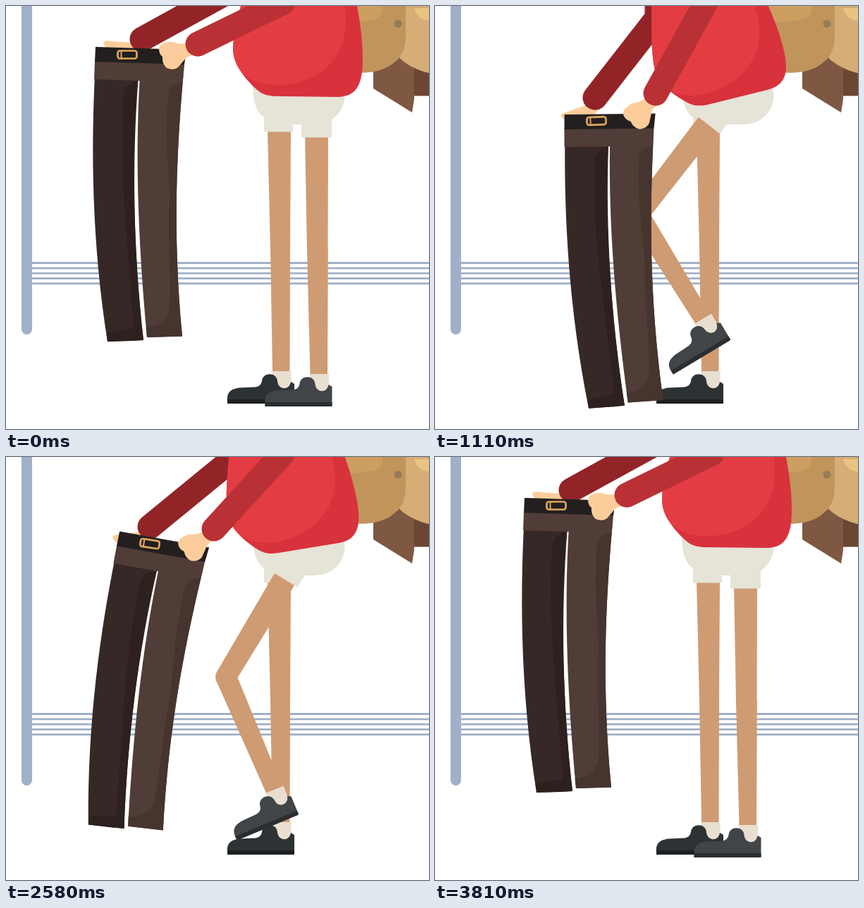
Animation, 600 px wide and 600 px high, one loop 4.23 s. Source, as an HTML page with a canvas:

```html
<!DOCTYPE html>
<html lang="en">
<head>
<meta charset="utf-8">
<title>Trying on trousers</title>
<style>
html, body { margin: 0; width: 100%; height: 100%; overflow: hidden; background: #fff; }
canvas { display: block; width: 100vw; height: 100vh; }
</style>
</head>
<body>
<canvas id="stage" width="600" height="600"></canvas>
<script>
const ctx = document.getElementById('stage').getContext('2d');
const LOOP = 4230, STEP = 30, END = 3810;
const SKIN = '#cf9b72', HAND = '#fccd9b', SOCK = '#e9dfd0', SHORTS = '#e6e3d7', RACK = '#9fb0c8';

// Pose tracks, one value per key time; angles in degrees.
const TIMES = [0, 540, 660, 1110, 1680, 2160, 2580, 3330, 3810];
const TRACKS = {
  buckleX: [172, 225, 230, 229, 216, 210, 204, 173, 172],
  buckleY: [69, 165, 163, 163, 158, 154, 123, 74, 69],
  trousers: [0, -2.8, -2.9, -2.4, .4, 2.7, 8.4, .1, 0],
  body: [0, -12.5, -14, -14.6, -17.5, -16.5, -10, -.8, 0],
  thigh: [0, 27, 31, 38, 33, 32.5, 31.4, 2.2, 0],
  shin: [0, -22, -25, -31, -19, -20.5, -22.5, -1.2, 0],
  rearWristX: [193, 224, 230, 227, 210, 206, 204, 192, 193],
  rearWristY: [47, 130, 128, 130, 134, 130, 99, 50, 47],
  rearElbowX: [315, 318, 318, 315, 302, 307, 325, 314, 315],
  rearElbowY: [-20, 12, 16, 17, 28, 24, 0, -18, -20],
  frontWristX: [272, 310, 314, 313, 303, 299, 295, 272, 272],
  frontWristY: [54, 124, 123, 124, 122, 119, 102, 58, 54],
  frontElbowX: [393, 385, 384, 383, 376, 379, 392, 393, 393],
  frontElbowY: [-5, -4, -4, -3, 0, -1, -4, -4, -5]
};

// Monotone cubic interpolation: flat at turning points, smooth elsewhere.
function sample(values, t) {
  const last = TIMES.length - 1;
  if (t >= TIMES[last]) return values[last];
  const secant = i => (values[i + 1] - values[i]) / (TIMES[i + 1] - TIMES[i]);
  const slope = i => {
    if (i === 0 || i === last) return 0;
    const a = secant(i - 1), b = secant(i);
    return a * b > 0 ? 2 * a * b / (a + b) : 0;
  };
  const i = TIMES.findIndex(time => time > t) - 1;
  const h = TIMES[i + 1] - TIMES[i], u = (t - TIMES[i]) / h, v = 1 - u;
  return values[i] * v * v * (1 + 2 * u) + values[i + 1] * u * u * (3 - 2 * u)
    + h * u * v * (slope(i) * v - slope(i + 1) * u);
}

function fill(color, path) {
  ctx.fillStyle = color;
  ctx.fill(new Path2D(path));
}

function line(color, width, path, cap = 'butt') {
  ctx.strokeStyle = color;
  ctx.lineWidth = width;
  ctx.lineCap = cap;
  ctx.lineJoin = 'round';
  ctx.stroke(new Path2D(path));
}

function disc(color, x, y, r) {
  ctx.fillStyle = color;
  ctx.beginPath();
  ctx.arc(x, y, r, 0, 7);
  ctx.fill();
}

// Draws with the point (x, y) moved by (dx, dy) and turned about itself.
function posed(x, y, degrees, draw, dx = 0, dy = 0) {
  ctx.save();
  ctx.translate(x + dx, y + dy);
  ctx.rotate(degrees * Math.PI / 180);
  ctx.translate(-x, -y);
  draw();
  ctx.restore();
}

function rack() {
  line(RACK, 15, 'M29.5 -20V458.5', 'round');
  for (let i = 0; i < 5; i++) line(RACK, 2.8, `M37 ${364.5 + 7.3 * i}H600`);
}

function coats() {
  fill('#6b4632', 'M576 80H600V127.5H576Z');
  fill('#7e5843', 'M521 70H579V132L576 151L521 117Z');
  fill('#c1945b', 'M470 0H568V42C567 62 563 70 552 79C535 94 512 98 470 92Z');
  fill('#cc9f61', 'M470 0H534C535 12 530 18 518 20L470 25Z');
  fill('#d7ad77', 'M567 0H600V95C580 91 561 78 558 73Q567 62 567 42Z');
  fill('#e9c381', 'M579 3H600V21Q583 19 579 3Z');
  disc('#957b58', 556, 25, 5.5);
}

function foot(upper, sole) {
  fill(SOCK, 'M377 518H404.5V545H380Z');
  fill(upper, 'M314 560C313 547 320 543 331 541.5L354 540.5Q362 539 363 532C364 519 384 519 385 532C386 545 402 546 404 533L409 536V564H314Z');
  fill(sole, 'M314 558H409V562Q409 564 407 564H314Z');
}

function standingLeg() {
  fill(SKIN, 'M371 176H404L403 345L402.5 519H378L375 345Z');
  foot('#2d3234', '#1c1f20');
}

function shorts() {
  fill(SHORTS, 'M350 112L351 128Q354 150 366 158V178.5H407V168H440L480 112Z');
  disc(SHORTS, 440, 127, 40.5);
}

function movingLeg(p) {
  posed(441, 99, p.thigh, () => {
    fill(SKIN, 'M424 180H457L456.5 348H427Z');
    // The shin angle is absolute, so the thigh's turn is undone here.
    posed(441.8, 348, p.shin - p.thigh, () => {
      fill(SKIN, 'M427 346H456.8L456 523H431.5Z');
      disc(SKIN, 441.8, 348, 14.8);
      ctx.save();
      ctx.translate(53.5, 4);
      foot('#414548', '#2b2e31');
      ctx.restore();
    });
    fill(SHORTS, 'M419 140H462V186.5H419Z');
  });
}

function sweater(p) {
  posed(431, 115, p.body, () => {
    const left = 'M352 -80L340 -26Q322 38 322 60';
    fill('#d8323d', left + 'C322 75 330 92 345 108C358 122 365 128 385 128L470 129C498 129 506 110 506 75C506 40 500 0 480 -80Z');
    fill('#e33d43', left + 'C322 74 327 86 336 96C350 109 372 113 390 112C440 110 482 78 482 22C482 -10 475 -40 460 -80Z');
  });
}

function trousers(p) {
  posed(172, 69, p.trousers, () => {
    fill('#362826', 'M126 98C121 200 121 330 144 476L195 474C181 350 178 220 188 100Z');
    fill('#2d201f', 'M186 106C178 220 181 350 195 474L178 475L181 455C176 370 159 235 166 130Q168 109 186 106Z');
    fill('#2d201f', 'M142.5 464L181 457L180 475L144 476Z');
    fill('#513d37', 'M126 78L253 82C242 200 236 320 250 468.5L200 470C188 340 183 220 189.5 106L125 104Z');
    fill('#46342f', 'M253 82C242 200 236 320 250 468.5L200 470L198.5 456Q229 454 232 425C234 380 229 330 232 270C230 220 225 190 230 125Q231 109 250 108Z');
    fill('#231f1f', 'M127 58L256 62L253 83L126 79Z');
    ctx.strokeStyle = '#dfa75c';
    ctx.lineWidth = 2.7;
    ctx.beginPath();
    ctx.roundRect(158.5, 63.5, 27, 11, 3);
    ctx.stroke();
    line('#dfa75c', 2, 'M163.5 64V74');
  }, p.buckleX - 172, p.buckleY - 69);
}

function arm(p, side, color) {
  const x = p[side + 'WristX'], y = p[side + 'WristY'];
  const ex = p[side + 'ElbowX'], ey = p[side + 'ElbowY'];
  const angle = Math.atan2(y - ey, x - ex) * 180 / Math.PI;
  if (side === 'rear') {
    posed(193, 47, angle - 151, () =>
      fill(HAND, 'M138 53Q139 48 148 50L164 51L185 52L203 60L174 72L150 74Q143 72 144 64Z'), x - 193, y - 47);
  } else {
    posed(272, 54, .8 * (angle - 154), () =>
      fill(HAND, 'M217 61Q217 54 226 52Q236 49 242 53L260 54L268 68L256 73L244 87Q238 92 228 88Q221 82 222 72Q217 68 217 61Z'), x - 272, y - 54);
  }
  line(color, 35, `M${x} ${y}L${ex} ${ey}V-60`, 'round');
}

function frame(now) {
  const time = Math.min(END, Math.floor(now % LOOP / STEP) * STEP);
  const pose = {};
  for (const name in TRACKS) pose[name] = sample(TRACKS[name], time);
  ctx.fillStyle = '#fff';
  ctx.fillRect(0, 0, 600, 600);
  rack();
  coats();
  arm(pose, 'rear', '#922428');
  standingLeg();
  shorts();
  movingLeg(pose);
  sweater(pose);
  trousers(pose);
  arm(pose, 'front', '#ba3135');
}

const start = performance.now();
function tick() {
  frame(performance.now() - start);
  requestAnimationFrame(tick);
}
tick();
</script>
</body>
</html>
```
